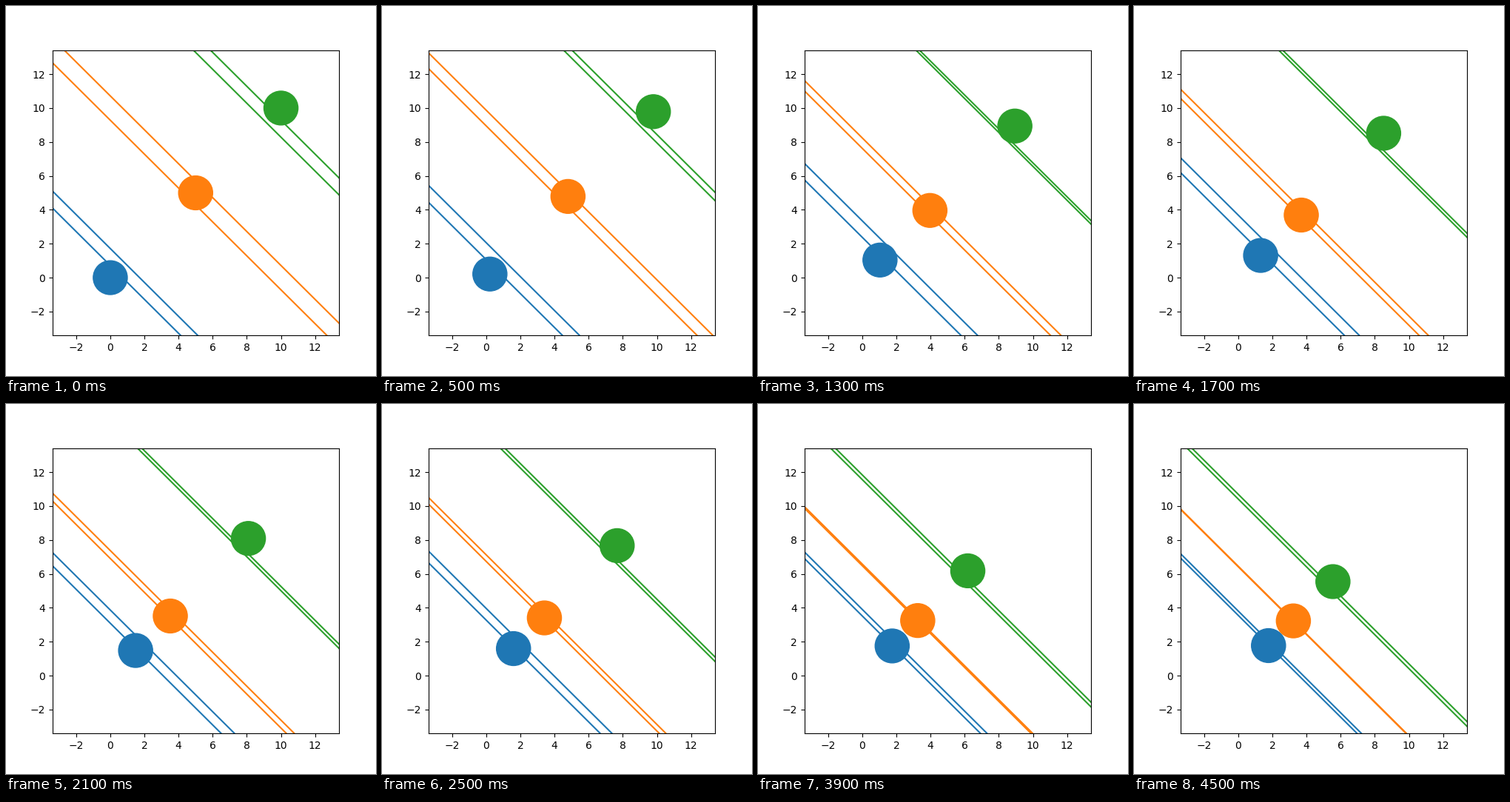
Write a matplotlib script that moves like this. It is 500 by 500 pixels and loops after 4.7 s.

```python
import numpy as np
import matplotlib.pyplot as plt
from matplotlib.animation import FuncAnimation
from matplotlib.patches import Circle

RADIUS = 1.0
HORIZON = 5.0      # steps a pair must stay clear of each other
MAX_SPEED = 0.3
STEPS = 22
INTERVAL = 100
HOLD = 5           # ticks the starting pose stays
TICKS_PER_STEP = 2

# Three discs on the diagonal; positions are distances from the origin.
START = np.array([0.0, 5.0, 10.0]) * np.sqrt(2)
HEADING = np.array([1, -1, -1])
PAIRS = [(a, b) for a in range(3) for b in range(3) if a != b]


def boundary(pos, vel, a, b):
    """Limit that disc b puts on the velocity of disc a."""
    gap = pos[b] - pos[a]
    clearance = np.sign(gap) * (abs(gap) - 2 * RADIUS) / HORIZON
    return (vel[a] + vel[b] + clearance) / 2


def simulate():
    pos, vel = START.copy(), np.zeros(3)
    states = []
    for _ in range(STEPS):
        limits = {pair: boundary(pos, vel, *pair) for pair in PAIRS}
        states.append((pos, {p: pos[p[0]] + v for p, v in limits.items()}))
        new_vel = HEADING * MAX_SPEED
        for (a, b), limit in limits.items():
            clip = min if b > a else max
            new_vel[a] = clip(new_vel[a], limit)
        vel = new_vel
        pos = pos + vel
    return states


STATES = simulate()

fig, ax = plt.subplots(figsize=(5, 5), dpi=100)
ax.set_xlim(-3.4, 13.4)
ax.set_ylim(-3.4, 13.4)

span = np.array([-10.0, 20.0])
lines = {(a, b): ax.plot(span, span, color=f"C{a}", lw=1.5)[0] for a, b in PAIRS}
discs = [ax.add_patch(Circle((0, 0), RADIUS, color=f"C{i}", zorder=2.2))
         for i in range(3)]


def update(tick):
    step = 0 if tick < HOLD else 1 + (tick - HOLD) // TICKS_PER_STEP
    pos, offsets = STATES[step]
    for disc, p in zip(discs, pos / np.sqrt(2)):
        disc.center = (p, p)
    for pair, line in lines.items():
        line.set_ydata(offsets[pair] * np.sqrt(2) - span)
    return [*lines.values(), *discs]


anim = FuncAnimation(fig, update, frames=HOLD + TICKS_PER_STEP * (STEPS - 1),
                     interval=INTERVAL, repeat=True, repeat_delay=0, blit=False)
plt.show()
```
